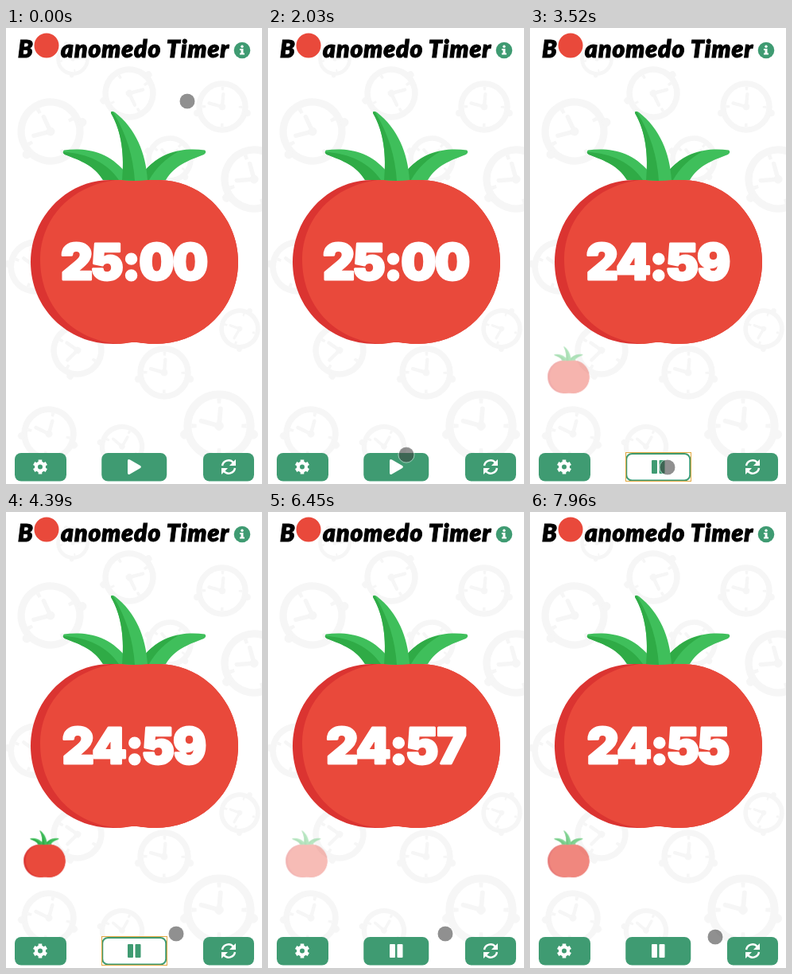
Write an HTML page that moves like this. It is 322 px wide and 573 px high and loops after 8 s.

```html
<!DOCTYPE html>
<html lang="en">
<head>
<meta charset="utf-8">
<title>Banomedo Timer</title>
<style>
html, body { margin: 0; width: 100%; height: 100%; overflow: hidden; background: #fff; }
svg { display: block; }
#stage { width: 100%; height: 100%; }
.green { fill: #3f9b72; }
.white { fill: #fff; }
.clocks { fill: #f6f6f6; stroke: #f6f6f6; }
.title { font: italic 900 30px Lato, sans-serif; letter-spacing: 1px; fill: #000; stroke: #000; stroke-width: 1; }
.time { font: 900 62px Inter, sans-serif; font-feature-settings: "calt" 0; letter-spacing: -1.6px; text-anchor: middle; fill: #fff; stroke: #fff; stroke-width: 3; stroke-linejoin: round; }

.count, .mini, .cursor, .face, .icon, .play, .pause, .focus { animation: 8s linear infinite; }
.count { animation-name: count; animation-timing-function: step-end; }
.mini { animation-name: blink; }
.cursor { animation-name: move; }
.face { animation-name: face; }
.icon { animation-name: icon; }
.play { animation-name: play; animation-timing-function: step-end; }
.pause { animation-name: pause; animation-timing-function: step-end; }
.focus { animation-name: focus; animation-timing-function: step-end; }

@keyframes count {
  0% { transform: translateY(0); }
  43.75% { transform: translateY(-100px); }
  57.1% { transform: translateY(-200px); }
  70.4% { transform: translateY(-300px); }
  83.1% { transform: translateY(-400px); }
  95.6%, 100% { transform: translateY(-500px); }
}
@keyframes blink {
  0%, 36.25% { opacity: 0; }
  55% { opacity: 1; }
  73.4% { opacity: 0; }
  92.875% { opacity: 1; }
  100% { opacity: .63; }
}
@keyframes move {
  0%, 5.9% { transform: translate(228px, 92px); animation-timing-function: ease-in-out; }
  11.6%, 15% { transform: translate(194px, 334px); animation-timing-function: ease-in-out; }
  18.5%, 20.9% { transform: translate(185px, 419px); animation-timing-function: ease-in-out; }
  25.375% { transform: translate(174px, 536px); animation-timing-function: ease-out; }
  29.375%, 50% { transform: translate(173px, 552px); animation-timing-function: ease-in-out; }
  54.875% { transform: translate(214px, 530px); animation-timing-function: ease-out; }
  59%, 87% { transform: translate(223px, 530px); animation-timing-function: ease-in-out; }
  97.5%, 100% { transform: translate(233px, 534px); }
}
@keyframes face {
  0%, 32% { fill: #3f9b72; }
  34.4%, 63.1% { fill: #fff; }
  65.5%, 100% { fill: #3f9b72; }
}
@keyframes icon {
  0%, 32% { fill: #fff; }
  34.4%, 63.1% { fill: #3f9b72; }
  65.5%, 100% { fill: #fff; }
}
@keyframes play {
  0% { opacity: 1; }
  36.125%, 100% { opacity: 0; }
}
@keyframes pause {
  0% { opacity: 0; }
  36.125%, 100% { opacity: 1; }
}
@keyframes focus {
  0% { opacity: 0; }
  36.125% { opacity: 1; }
  63.1%, 100% { opacity: 0; }
}
</style>
</head>
<body>
<svg id="stage" viewBox="0 0 322 573">
  <defs>
    <g id="clock">
      <circle r="44" fill="none" stroke-width="11"/>
      <circle r="35" fill="none" stroke-width="7" pathLength="40" stroke-dasharray="1 9" stroke-dashoffset=".5"/>
      <path d="M0 0L-25-7M0 0L2-24" fill="none" stroke-width="6.500" stroke-linecap="round"/>
      <circle r="6"/>
      <circle cx="-48" cy="12" r="6"/>
      <circle cx="48" cy="12" r="6"/>
    </g>
    <g id="tomato">
      <path fill="#db3431" d="M131 191Q161 189 192 191C247 191 292 238 292 294C292 352 246 397 188 397C175 397 170 395 161 395C152 395 147 397 135 397C77 397 31 352 31 294C31 238 76 191 131 191Z"/>
      <path fill="#e9493b" d="M146 190.300Q170 189.500 192 191C247 191 292 238 292 294C292 352 246 397 188 397C175 397 170 395 161 395C154 395 150 396.500 143 397C83 393 43 348 43 291C43 237 86 194 146 190.300Z"/>
      <g id="leaf">
        <path fill="#3fbf5b" d="M73 153.500C100 150 128 155 149 180L146 191H122C111 173 95 167 74 159Q70 156 73 153.500Z"/>
        <path fill="#2fab46" d="M72 156C102 157 128 170 142 191H122C111 173 95 167 74 159Q71 157 72 156Z"/>
      </g>
      <path fill="#3fbf5b" d="M250 153.500C223 150 195 155 174 180L177 191H201C212 173 228 167 249 159Q253 156 250 153.500Z"/>
      <path fill="#2fab46" d="M217 155C199 158 185 167 174 180L177 191H180C189 175 201 164 217 155Z"/>
      <path fill="#3fbf5b" d="M132 107Q132 103 137 106C163 126 176 157 178 191Q161 193 146 191C149 161 146 131 132 107Z"/>
      <path fill="#2fab46" d="M132 107Q132 103 135.500 107C151 133 160 160 162 192L146 191C149 161 146 131 132 107Z"/>
    </g>
  </defs>

  <g class="clocks">
    <use href="#clock" transform="translate(56 130) rotate(-30) scale(.84)"/>
    <use href="#clock" transform="translate(155 82) rotate(150) scale(.68)"/>
    <use href="#clock" transform="translate(272 99) scale(.66)"/>
    <use href="#clock" transform="translate(312 190) rotate(-20) scale(.84)"/>
    <use href="#clock" transform="translate(206 165) rotate(35) scale(.6)"/>
    <use href="#clock" transform="translate(84 39) rotate(80) scale(.42)"/>
    <use href="#clock" transform="translate(37 300) rotate(20) scale(.7)"/>
    <use href="#clock" transform="translate(294 378) rotate(-75) scale(.52)"/>
    <use href="#clock" transform="translate(90 405) rotate(-60) scale(.68)"/>
    <use href="#clock" transform="translate(199 433) scale(.68)"/>
    <use href="#clock" transform="translate(268 500) scale(.9)"/>
    <use href="#clock" transform="translate(54 510) rotate(10) scale(.7)"/>
    <use href="#clock" transform="translate(146 526) rotate(25) scale(.57)"/>
  </g>

  <text class="title" x="15" y="37">B</text>
  <circle cx="51" cy="22" r="15.500" fill="#e9493b"/>
  <text class="title" x="69" y="37">anomedo Timer</text>
  <circle class="green" cx="297" cy="28" r="10.300"/>
  <path class="white" d="M294 26h4.500v5.500h1.500v2h-6v-2h1.500v-3.500h-1.500z"/>
  <circle class="white" cx="297" cy="23.300" r="1.700"/>

  <use href="#tomato"/>
  <svg y="255" width="322" height="75" overflow="hidden">
    <g class="count time">
      <text x="160.700" y="60.500">25:00</text>
      <text x="160.700" y="160.500">24:59</text>
      <text x="160.700" y="260.500">24:58</text>
      <text x="160.700" y="360.500">24:57</text>
      <text x="160.700" y="460.500">24:56</text>
      <text x="160.700" y="560.500">24:55</text>
    </g>
  </svg>
  <g class="mini"><use href="#tomato" transform="translate(16 379.300) scale(.201)"/></g>

  <g class="green">
    <rect x="11" y="534" width="65" height="35.500" rx="8"/>
    <rect x="248" y="534" width="64" height="35.500" rx="8"/>
  </g>
  <rect class="face" x="121.250" y="535" width="80" height="33.500" rx="7" stroke="#3f9b72" stroke-width="2"/>
  <rect class="focus" x="120.500" y="533.500" width="82" height="36" fill="none" stroke="#e3a83f"/>

  <g class="icon">
    <path class="play" d="M153 544Q153 541 156 542.500L169 550Q170.700 551.500 169 553L156 560.500Q153 562 153 559Z"/>
    <path class="pause" d="M154 543h5q1 0 1 1v15q0 1-1 1h-5q-1 0-1-1v-15q0-1 1-1zM163.500 543h5q1 0 1 1v15q0 1-1 1h-5q-1 0-1-1v-15q0-1 1-1z"/>
  </g>

  <g transform="translate(43 551.500)" fill="none" stroke="#fff">
    <circle r="5" stroke-width="4"/>
    <path stroke-width="4.600" d="M0-5.500V-9M0 5.500V9M4.800-2.750L7.800-4.500M-4.800 2.750L-7.800 4.500M4.800 2.750L7.800 4.500M-4.800-2.750L-7.800-4.500"/>
  </g>
  <g transform="translate(280 551.500)">
    <path d="M-8-1.500A8 8 0 0 1 6-5.300M8 1.500A8 8 0 0 1-6 5.300" fill="none" stroke="#fff" stroke-width="2.500"/>
    <path class="white" d="M9-9.500V-1.500H1L3.600-4.200L6.200-6.800ZM-9 9.500V1.500H-1L-3.600 4.200L-6.200 6.800Z"/>
  </g>

  <g class="cursor">
    <circle r="9.600" fill="#3c3c3c" fill-opacity=".57"/>
    <circle r="10.100" fill="none" stroke="#fff" stroke-opacity=".5"/>
  </g>
</svg>
</body>
</html>
```
